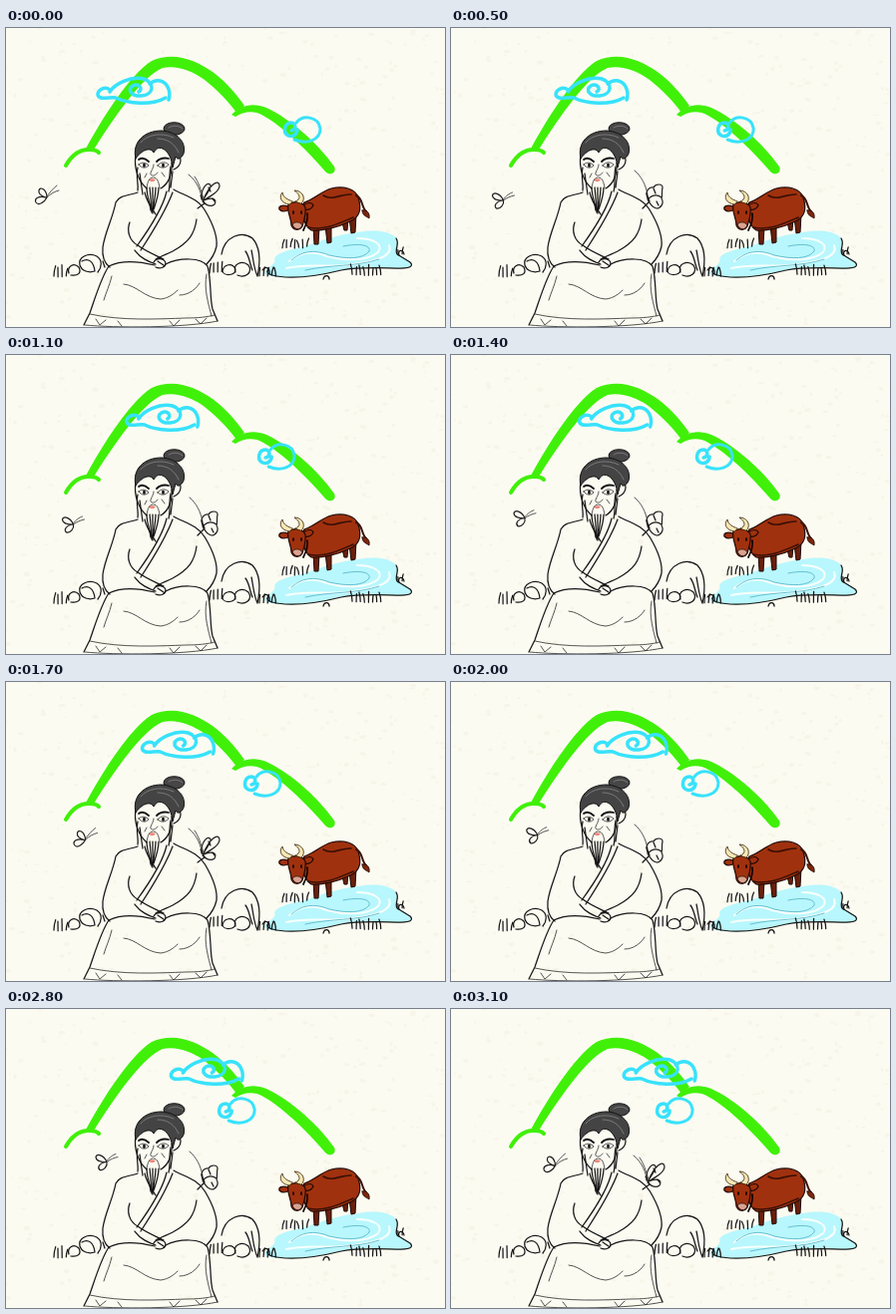
An HTML page for the animation above (3200 ms loop, 440 by 300 pixels).

```html
<!DOCTYPE html>
<html lang="en">
<head>
<meta charset="utf-8">
<title>Sage by the pond</title>
<style>
  html, body { margin: 0; width: 100%; height: 100%; overflow: hidden; background: #fcfbf1; }
  svg { display: block; width: 100vw; height: 100vh; }
  path { stroke-linecap: round; stroke-linejoin: round; }
  .ink { fill: none; stroke: #161616; stroke-width: 1.25; }
  .thin { fill: none; stroke: #2a2a2a; stroke-width: .8; }
  .green { fill: #40f008; }
  .cloud { fill: none; stroke: #38e2fc; stroke-width: 3.5; }
  .wing { fill: none; stroke: #1c1c1c; stroke-width: 1.2; }
  .hide { fill: #a0310e; stroke: #210a04; stroke-width: 1.2; }
</style>
</head>
<body>
<svg viewBox="0 0 440 300">
  <g id="paper"></g>

  <g id="hills" class="green">
    <path d="M80 121C97 90 123 48 146 33C168 23 190 32 207 44C222 55 232 68 239 78L231 85C224 75 212 62 199 52C186 42 170 37 157 40C137 48 108 90 88 122Z"/>
    <path d="M226 87C234 78 247 74 261 80C285 91 313 116 329 139C332 145 325 149 320 144C304 125 278 99 258 88C248 82 238 84 230 89Z"/>
    <path d="M60 138C66 127 75 121 84 122C89 122 91 123 93 125" fill="none" stroke="#40f008" stroke-width="4"/>
  </g>

  <g id="pond">
    <path d="M259 246C261 240 272 237 269 231C273 224 288 222 300 219C318 212 336 207 352 205C368 202 386 203 392 212C394 219 389 224 392 227C400 231 408 235 407 239C396 243 380 240 360 240C336 241 318 248 296 250C280 250 264 251 259 246Z" fill="#b8f7fd"/>
    <path d="M284 234C296 224 310 224 322 229C340 234 362 234 373 225C379 217 368 211 352 211M281 241C304 235 330 242 354 236C374 233 388 228 384 218" fill="none" stroke="#f7fffc" stroke-width="2"/>
    <path d="M286 233C298 222 312 223 324 228C342 232 358 232 364 224C366 217 352 216 338 219M300 243C326 237 350 240 374 232" fill="none" stroke="#5cb9cc" stroke-width=".9"/>
    <path class="ink" d="M263 242C259 247 268 249 280 250C300 251 320 247 336 243C356 239 380 241 396 241C407 241 408 238 405 235L392 227C389 222 395 217 391 211"/>
  </g>

  <g id="cow">
    <path d="M344 190L346 206L350 205L351 187ZM308 199L309 217L313 217L314 200ZM320 198L322 216L326 215L326 196ZM337 195L339 203L342 203L343 191Z" fill="#6a200c" stroke="#1d0905"/>
    <path class="hide" d="M299 175C308 172 316 164 326 161C338 158 350 161 353 170C357 182 354 190 345 194C333 200 316 204 306 203C298 198 294 181 299 175Z"/>
    <path d="M303 200C318 204 334 196 348 190M318 168C327 174 336 166 346 167" fill="none" stroke="#3a1006" stroke-width="1.6"/>
    <path class="hide" d="M283 179C276 177 273 179 274 182C277 185 281 184 284 182ZM297 179C302 174 307 175 308 178C306 182 302 183 298 182Z"/>
    <path class="hide" d="M283 177C288 173 297 174 300 180C301 187 299 192 297 199C294 204 288 203 286 198C286 190 281 184 283 177Z"/>
    <path d="M287 197C289 194 295 194 297 198C295 203 289 203 287 197Z" fill="#d9a390" stroke="#210a04" stroke-width=".8"/>
    <path d="M284 177C276 176 273 170 277 165C278 171 283 172 287 174ZM290 174C296 172 295 167 289 163C298 163 301 172 296 176Z" fill="#f6e8b5" stroke="#4c3517" stroke-width=".9"/>
    <path d="M288 184v2M296 184v2M302 186C303 192 301 197 298 203" fill="none" stroke="#100" stroke-width="1.7"/>
    <path d="M351 168C358 171 356 180 361 184" fill="none" stroke="#3a1208" stroke-width="2"/>
    <path d="M357 183C362 182 365 186 364 191C361 189 357 188 357 183Z" fill="#7c260c" stroke="#210a04" stroke-width=".8"/>
  </g>

  <g id="rocks" class="ink">
    <path d="M74 238C72 230 82 225 91 229C97 233 96 240 92 245M76 234C83 230 88 235 89 244C83 246 76 244 74 238M63 246C61 239 68 235 73 240C76 246 72 249 65 248M97 234L99 240"/>
    <path d="M216 227C219 209 236 203 247 211C255 220 255 235 252 249M240 224C244 229 244 236 247 243M246 223C248 232 248 240 252 249M217 244C218 237 227 235 230 242C230 249 218 249 217 244ZM230 245C227 236 237 233 243 238C248 246 239 251 232 248"/>
    <path d="M394 228C392 223 398 221 399 227M318 252C319 247 324 248 324 252M257 243C260 238 265 241 264 247"/>
  </g>
  <g id="grass" class="ink"></g>

  <g id="sage">
    <path class="ink" d="M132 165C123 168 113 168 110 175C107 191 99 205 97 220C96 231 100 237 104 240M168 162C178 168 192 170 200 184C207 196 212 209 211 219C209 228 205 233 201 237"/>
    <path class="ink" d="M167 165C161 181 150 200 135 223M161 164C158 177 147 197 131 219M139 165C141 174 146 181 150 187M124 195C121 203 123 213 132 218C140 224 150 228 158 232M191 192C189 207 183 215 167 224C161 227 155 229 150 232M148 235C151 230 159 231 160 236C160 240 155 242 150 240M152 234L158 238M129 223C135 231 142 234 150 237"/>
    <path class="ink" d="M103 239C117 232 133 234 149 238M103 239C95 251 89 272 84 286L78 298M160 237C174 230 196 230 202 239C206 253 204 270 207 282L212 294"/>
    <path class="thin" d="M118 257C131 258 139 271 155 272C163 271 168 267 172 263M174 268C184 268 191 261 194 256M106 249C104 258 100 266 98 273M201 247C198 262 203 277 206 289"/>
    <path class="thin" d="M84 287C115 294 153 292 180 291C192 291 202 290 209 288M79 298C108 301 180 301 212 294M90 292L94 298L100 293M112 294L116 299M164 294L168 299L174 293M190 292L195 297L201 291"/>

    <path class="ink" d="M130 127C128 140 132 153 141 161M166 135C167 148 162 157 155 161M170 129C177 127 177 138 168 142"/>
    <ellipse cx="168.500" cy="101" rx="10.5" ry="6.3" fill="#464646" stroke="#111"/>
    <path d="M130 131C126 115 138 103 156 103C172 104 181 115 178 126C176 131 172 133 170 129L167 140C166 131 163 124 157 121C152 119 150 122 148 125C145 119 136 122 130 131Z" fill="#444" stroke="#111"/>
    <path d="M135 115C141 107 156 104 168 110M152 111C162 111 169 116 173 125M163 100C168 97 174 98 177 101" fill="none" stroke="#888" stroke-width=".8"/>
    <path d="M133 132C136 130 140 131 143 134M151 134C154 131 159 130 163 131" fill="none" stroke="#111" stroke-width="1.8"/>
    <path class="thin" d="M133 137C136 134 141 135 143 138C140 141 136 141 133 137ZM152 138C155 134 160 134 163 137C160 141 155 141 152 138ZM148 137C148 141 144 145 145 147C147 149 150 148 152 145M141 146L139 150M156 145L159 149"/>
    <path d="M138.500 137v1.5M157.500 137v1.5" stroke="#111" stroke-width="2.600"/>
    <path d="M143 152C145 151 148 151 150 152C148 155 145 155 143 152Z" fill="#f0857a"/>
    <path class="thin" d="M147 150C143 150 142 155 141 160M148 150C152 150 153 155 154 160"/>
    <path class="ink" d="M141 160C141 168 144 174 145 183M144 160C145 168 145 174 146 185M147 160L147 186M150 160C150 168 148 176 147 184M153 160C153 168 150 176 148 182M132 140C130 149 133 156 132 163M134 146L137 167M165 139C163 149 165 156 163 164M167 144L165 160"/>
  </g>

  <g id="hover"></g>
  <g id="fly"></g>

  <g id="cloudL" class="cloud">
    <path d="M104 62C99 58 92 62 92 67C93 73 104 69 110 70C122 76 146 78 160 70"/>
    <path d="M104 64C109 56 125 48 138 51C150 55 148 67 136 68C126 69 121 62 127 58C133 55 138 61 133 64"/>
    <path d="M144 56C151 50 159 53 162 59C165 65 164 69 163 72"/>
  </g>
  <g id="cloudR" class="cloud">
    <path d="M286 103C291 102 291 95 286 95C279 95 277 105 283 108C288 110 292 106 292 102"/>
    <path d="M291 95C297 87 313 88 315 101C315 113 301 117 289 112" stroke-width="3"/>
  </g>
</svg>
<script>
const $ = id => document.getElementById(id);
const LOOP = 3200, STEP = 100;

let seed = 7;
const rand = () => (seed = (seed * 16807) % 2147483647) / 2147483647;

// Faintly mottled paper
let spots = '';
for (let i = 0; i < 420; i++) {
  const x = rand() * 440, y = rand() * 300, rx = .8 + rand() * 2.4, ry = .6 + rand() * 1.6;
  spots += `<ellipse cx="${x.toFixed(1)}" cy="${y.toFixed(1)}" rx="${rx.toFixed(1)}" ry="${ry.toFixed(1)}"/>`;
}
$('paper').innerHTML = `<rect width="440" height="300" fill="#fcfbf1"/><g fill="#ebe7d4" opacity=".28">${spots}</g>`;

// Tufts: x, base y, blades, height
const tufts = [[48, 250, 4, 12], [204, 246, 4, 15], [277, 221, 7, 9], [254, 249, 5, 9],
               [347, 249, 8, 11], [393, 228, 2, 7]];
$('grass').innerHTML = tufts.map(([x, y, n, h]) => {
  let d = '';
  for (let i = 0; i < n; i++) {
    const bx = x + i * 4.1, top = h * (.6 + .4 * rand());
    d += `M${bx} ${y - rand() * 2}q0 ${-top / 2} ${(rand() - .5) * 4} ${-top}`;
  }
  return `<path d="${d}"/>`;
}).join('');

const wing = d => `<path class="wing" d="${d}"/>`;
const thin = d => `<path class="thin" d="${d}"/>`;

const hoverPose = [
  wing('M196 172C195 160 203 153 205 158C206 161 201 166 198 172C204 157 213 151 214 158C214 164 205 169 198 173C207 169 212 172 209 177C205 180 200 177 197 174') +
  thin('M197 173C195 164 192 154 183 147M198 171C195 161 193 155 189 149') +
  `<path class="ink" d="M195 168L199 176L192 181M203 160L205 164M207 171L209 174"/>`,
  wing('M197 171C194 163 199 159 203 160C205 156 212 156 212 160C211 164 212 168 211 171C214 176 210 181 206 181C202 180 199 176 197 172C202 167 207 167 211 170') +
  thin('M197 167C195 157 191 149 184 143') +
  `<path class="ink" d="M196 166L199 174L192 181M203 161L205 166M206 174L208 178"/>`
];

const flyPose = [
  wing('M0 1C-1 -7 -7 -9 -8 -5C-9 -1 -4 1 -1 2C-8 0 -13 3 -11 7C-8 11 -2 6 0 2') +
  thin('M-1 2C3 -3 6 -7 10 -10M0 2C4 -2 8 -4 12 -5'),
  wing('M1 1C-2 -6 -9 -8 -10 -4C-10 0 -4 1 0 1C-6 2 -9 6 -6 9C-2 10 2 5 1 1') +
  thin('M0 1C4 -4 7 -6 10 -7M1 1C5 -2 8 -3 12 -4')
];

// Flight path: time, x, y
const flight = [[0, 41, 168], [500, 51.5, 172], [1100, 66.500, 169], [1700, 79.500, 156.500],
                [2300, 92, 149], [2800, 100, 152.500], [3200, 106, 156]];

function flightAt(t) {
  const i = flight.findIndex(p => p[0] > t);
  const a = flight[i - 1], b = flight[i], k = (t - a[0]) / (b[0] - a[0]);
  return [a[1] + (b[1] - a[1]) * k, a[2] + (b[2] - a[2]) * k];
}

const move = (id, x, y) => $(id).setAttribute('transform', `translate(${x.toFixed(2)} ${y.toFixed(2)})`);

let shown = -1;
function draw(t) {
  const n = Math.floor((t % LOOP) / STEP);
  if (n === shown) return;
  shown = n;
  const time = n * STEP, pose = (n + 1) % 8 < 4 ? 0 : 1;
  move('cloudL', time * .0262, 0);
  move('cloudR', time * -.0235, 0);
  move('fly', ...flightAt(time));
  $('fly').innerHTML = flyPose[pose];
  $('hover').innerHTML = hoverPose[pose];
}

const start = performance.now();
function tick() {
  draw(performance.now() - start);
  requestAnimationFrame(tick);
}
tick();
</script>
</body>
</html>
```
